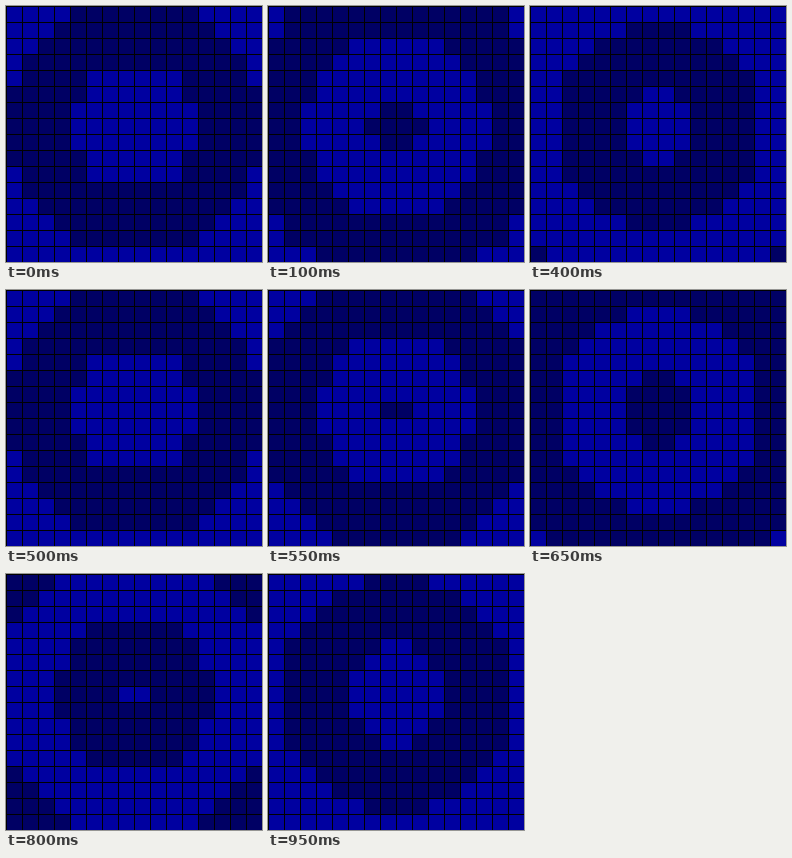
An HTML page with a canvas for the animation above (1 s loop, 256 px wide and 256 px high).

```html
<!DOCTYPE html>
<html>
<head>
<meta charset="utf-8">
<style>
  html, body { margin: 0; height: 100%; overflow: hidden; background: #000; }
  canvas { display: block; }
</style>
</head>
<body>
<canvas id="stage" width="256" height="256"></canvas>
<script>
const ctx = document.getElementById('stage').getContext('2d');
const CELL = 16, BAND = 4, STEP_MS = 50, STEPS = 20, SPEED = 0.8;
const BRIGHT = '#0000a0', DARK = '#000064';
const start = performance.now();

// Rings of equal width spread outwards from (7.5, 7) on the cell grid.
function draw(step) {
  ctx.fillStyle = '#000';
  ctx.fillRect(0, 0, 256, 256);
  for (let y = 0; y < 16; y++) {
    for (let x = 0; x < 16; x++) {
      const r = Math.hypot(x - 7.5, y - 7);
      const band = Math.floor((r - SPEED * step) / BAND);
      ctx.fillStyle = band % 2 === 0 ? BRIGHT : DARK;
      ctx.fillRect(x * CELL + 1, y * CELL + 1, CELL - 1, CELL - 1);
    }
  }
}

function tick() {
  draw(Math.floor((performance.now() - start) / STEP_MS) % STEPS);
  requestAnimationFrame(tick);
}
tick();
</script>
</body>
</html>
```
